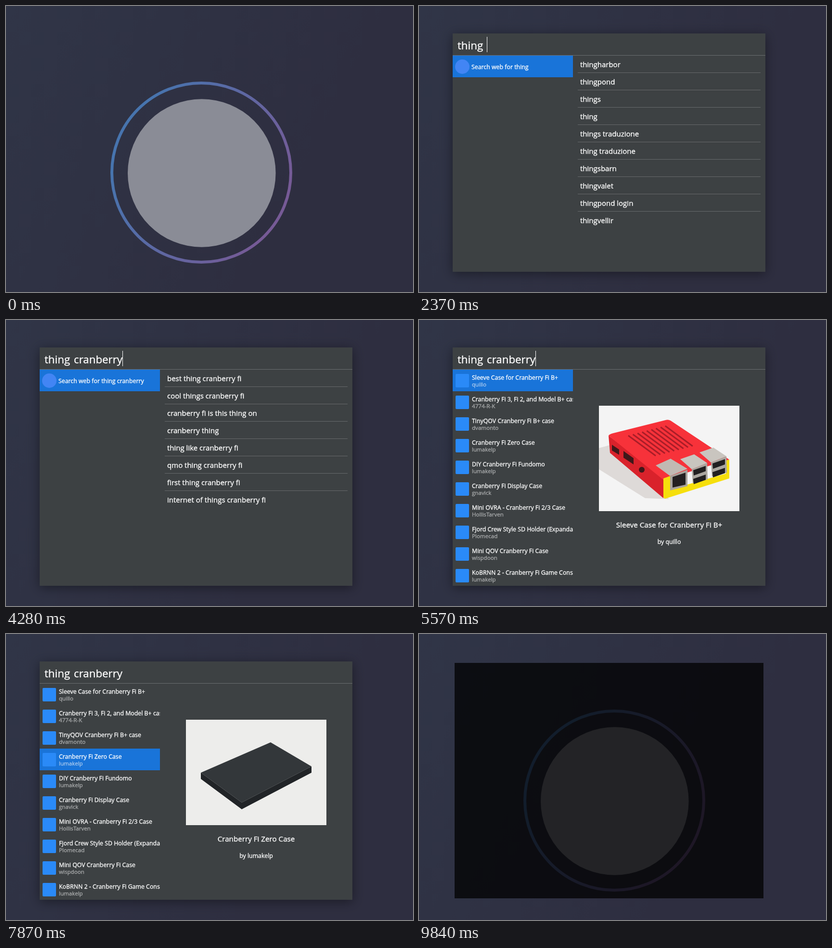
Animation of 846 by 594 pixels, one loop 9900 ms. Source, as an HTML page with a canvas:

```html
<!DOCTYPE html>
<html lang="en">
<head>
<meta charset="utf-8">
<title>Launcher search</title>
<style>
html, body { margin: 0; width: 846px; height: 594px; overflow: hidden; background: #2e2e40; }
canvas { display: block; }
</style>
</head>
<body>
<canvas id="stage" width="846" height="594"></canvas>
<script>
const c = document.getElementById('stage').getContext('2d');
const LOOP = 9900;
const FONT = '"Open Sans", "Noto Sans", sans-serif';
const SMALL = 12.35;
const QUERY = 'thing cranberry';

// [time, letters typed]
const typing = [[1440, 1], [1600, 2], [1760, 3], [1920, 4], [2080, 5], [2370, 6],
  [2600, 7], [2830, 8], [3000, 9], [3210, 10], [3440, 11], [3580, 12],
  [3810, 13], [3970, 14], [4120, 15]];
// [time, selected row]
const picks = [[4570, 0], [6650, 1], [7330, 2], [7870, 3], [8460, 4], [9080, 5]];
// [time, caret visible]
const blinks = [[210, 1], [670, 0], [1130, 1], [5030, 0], [5570, 1], [6030, 0], [6490, 1],
  [7170, 0], [7330, 1], [7790, 0], [7930, 1], [8400, 0], [8460, 1], [8920, 0],
  [9080, 1], [9600, 0]];

const firstHints = ['thingharbor', 'thingpond', 'things', 'thing', 'things traduzione',
  'thing traduzione', 'thingsbarn', 'thingvalet', 'thingpond login', 'thingvellir'];
const laterHints = ['best thing cranberry fi', 'cool things cranberry fi',
  'cranberry fi is this thing on', 'cranberry thing', 'thing like cranberry fi',
  'qmo thing cranberry fi', 'first thing cranberry fi', 'internet of things cranberry fi'];

const items = [
  { title: 'Sleeve Case for Cranberry Fi B+', by: 'quillo', draw: sleeveCase },
  { title: 'Cranberry Fi 3, Fi 2, and Model B+ case with OMRA mounts and more', by: '4774-R-K',
    lines: ['Cranberry Fi 3, Fi 2, and Model B+ case with OMRA', 'mounts and more'], draw: ventCase },
  { title: 'TinyQOV Cranberry Fi B+ case', by: 'dvamonto', draw: greyBox },
  { title: 'Cranberry Fi Zero Case', by: 'lumakelp', draw: smallCase },
  { title: 'DIY Cranberry Fi Fundomo', by: 'lumakelp', draw: handheld },
  { title: 'Cranberry Fi Display Case', by: 'gnavick', draw: displayCase },
  { title: 'Mini OVRA - Cranberry Fi 2/3 Case', by: 'HollisTarven' },
  { title: 'Fjord Crew Style SD Holder (Expandable)', by: 'Plomecad' },
  { title: 'Mini QOV Cranberry Fi Case', by: 'wispdoon' },
  { title: 'KoBRNN 2 - Cranberry Fi Game Console', by: 'lumakelp' }
];

function at(track, t, start) {
  let value = start;
  for (const [time, v] of track) if (t >= time) value = v;
  return value;
}

function rect(color, x, y, w, h) {
  c.fillStyle = color;
  c.fillRect(x, y, w, h);
}

function fill(color, path) {
  c.fillStyle = color;
  c.fill(new Path2D(path));
}

function stroke(color, width, path) {
  c.strokeStyle = color;
  c.lineWidth = width;
  c.stroke(new Path2D(path));
}

function disc(color, x, y, r) {
  c.fillStyle = color;
  c.beginPath();
  c.arc(x, y, r, 0, Math.PI * 2);
  c.fill();
}

function box(color, x, y, w, h, r) {
  c.fillStyle = color;
  c.beginPath();
  c.roundRect(x, y, w, h, r);
  c.fill();
}

// A hairline outline gives the glyphs a slightly heavier weight.
function text(str, x, y, size, color = '#fff', align = 'left') {
  c.font = size + 'px ' + FONT;
  c.textAlign = align;
  c.fillStyle = c.strokeStyle = color;
  c.lineWidth = 0.35;
  c.lineJoin = 'round';
  c.fillText(str, x, y);
  c.strokeText(str, x, y);
}

function gradient(x0, y0, x1, y1, from, to) {
  const g = c.createLinearGradient(x0, y0, x1, y1);
  g.addColorStop(0, from);
  g.addColorStop(1, to);
  return g;
}

function wallpaper() {
  rect(gradient(0, 0, 640, 330, '#303547', '#2e2e40'), 0, 0, 846, 594);
  c.strokeStyle = gradient(260, 270, 560, 430, '#4774ae', '#765a96');
  c.lineWidth = 6;
  c.beginPath();
  c.arc(406, 346, 186, 0, Math.PI * 2);
  c.stroke();
  disc('#8a8c96', 406.8, 347, 153.8);
}

function panel(h) {
  c.save();
  c.shadowColor = 'rgba(0,0,0,.4)';
  c.shadowBlur = 22;
  c.shadowOffsetY = 4;
  rect('#3d4143', 70, 57, 650, h);
  c.restore();
}

function searchBar(query, caret) {
  c.wordSpacing = '2.2px';
  text(query, 80, 90, 22.3);
  const x = Math.round(80 + c.measureText(query).width);
  c.wordSpacing = '0px';
  if (caret) rect('#fff', x, 64, 1, 32);
}

function hints(query, list) {
  rect('#1974d9', 70, 103, 250, 45);
  disc('#4285f4', 90, 126, 15);
  text('Search web for ' + query.trim(), 109, 131, SMALL);
  list.forEach((hint, i) => {
    text(hint, 335, 127 + 36 * i, 15);
    if (i) rect('#66696b', 330, 102 + 36 * i, 380, 1);
  });
}

function results(pick) {
  c.save();
  c.beginPath();
  c.rect(70, 103, 250, 449);
  c.clip();
  items.forEach((item, i) => {
    const y = 103 + 45 * i;
    if (i === pick) rect('#1974d9', 70, y, 250, 45);
    box('#2a8af8', 76, y + 9, 28, 28, 2);
    text(item.title, 110, y + 21, SMALL);
    text(item.by, 110, y + 35, 11.6, i === pick ? '#a9c9ee' : '#a9abac');
  });
  c.restore();
}

function preview(item) {
  const lines = item.lines || [item.title];
  const top = 178 - 9 * (lines.length - 1);
  c.save();
  c.beginPath();
  c.rect(374, top, 292, 219);
  c.clip();
  item.draw();
  c.restore();
  lines.forEach((line, i) => text(line, 520, top + 253 + 18 * i, 15.2, '#fff', 'center'));
  text('by ' + item.by, 520, top + 269 + 18 * lines.length, SMALL, '#fff', 'center');
}

function usb(x, y) {
  fill('#c9c5bf', `M${x} ${y}l29 -10 27 18 -32 13z`);
  fill('#aaa69f', `M${x + 24} ${y + 21}l32 -13 1 34 -31 8z`);
  for (const d of [0, 18]) fill('#211f20', `M${x + 27} ${y + 23 + d}l26 -9v11l-25 9z`);
}

function sleeveCase() {
  rect('#f4f4f4', 374, 178, 292, 219);
  fill('#dedad8', 'M374 266L396 260 520 372 470 370 374 310z');
  fill('#d9222b', 'M394 240L508 328 508 370 397 276z');
  fill('#f7323a', 'M394 240Q396 237 404 235L512 208Q518 206 523 209L645 290 508 332z');
  for (let i = 0; i < 9; i++) {
    const x = 435 + i * 9.6, y = 240 - i * 2.5;
    stroke('#a91d28', 3, `M${x} ${y}l57 42`);
  }
  fill('#40181a', 'M401 259l15 10v11l-15 -9zM425 272l21 15v13l-21 -14z');
  disc('#40181a', 463, 311, 6);
  fill('#f6df0c', 'M508 329L522 324 522 352 638 319 638 292 645 290V329L512 371Q508 371 508 366z');
  fill('#c1b9b3', 'M492 302L523 288 558 309 522 324z');
  fill('#a8a29b', 'M522 324L558 311V345L522 354z');
  fill('#242021', 'M527 326L554 317V342L527 348z');
  usb(543, 289);
  usb(583, 275);
}

function ventCase() {
  rect(gradient(374, 169, 666, 388, '#dfe2e6', '#d2d5da'), 374, 169, 292, 219);
  fill('#bfc3c8', 'M405 292L510 366 560 366 640 300 620 350 540 384 450 350z');
  stroke('#55595e', 13, 'M412 283L440 287M516 353L540 352');
  fill('#55595e', 'M418 260L530 340 630 275V294L532 366 418 283z');
  disc('#c5c7ca', 412, 283, 3);
  disc('#26282b', 516, 354, 4);
  fill('#b3141f', 'M417 238L530 332 629 262V282L534 356 522 350 417 262z');
  fill('#d91f2b', 'M416 237Q418 231 426 231L486 188Q494 185 501 192L626 253Q632 258 627 267L538 333Q529 340 521 333z');
  disc('#611016', 496, 243, 7);
  const arms = [[484, 212, 520, 226, 531, 249], [470, 238, 474, 259, 497, 276], [472, 224, 494, 228, 516, 254],
    [462, 247, 470, 271, 491, 282], [487, 221, 510, 235, 519, 259]];
  for (const [a, b, d, e, f, g] of arms) stroke('#611016', 5, `M${a} ${b}Q${d} ${e} ${f} ${g}`);
  stroke('#611016', 3, 'M460 233L482 218M489 283L514 267');
  stroke('#af1722', 4, 'M506 203L577 246M501 207L536 227');
  fill('#24262a', 'M430 269l14 10v6l-14 -9zM456 281l21 15v9l-21 -14z');
  disc('#24262a', 494, 316, 6);
  fill('#c7c8ca', 'M550 326L573 313V337L550 350z');
  fill('#222428', 'M553 329L570 319V335L553 346z');
  for (const [x, y] of [[552, 286], [582, 268]]) {
    fill('#d2d0cc', `M${x} ${y}l28 -10 19 19 -24 11z`);
    fill('#aaa9a7', `M${x + 24} ${y + 20}l23 -10v26l-22 13z`);
    for (const d of [0, 14]) fill('#26282b', `M${x + 27} ${y + 21 + d}l17 -8v10l-17 8z`);
  }
  for (const [x, y] of [[422, 239], [492, 193], [621, 261], [529, 330]]) {
    disc('#a91621', x, y, 8);
    disc('#d5d4d2', x, y, 5);
    disc('#777', x, y, 2);
  }
}

function greyBox() {
  rect('#d8d8d6', 374, 178, 292, 219);
  fill('#babab7', 'M410 270L520 222 635 280 520 340z');
  fill('#8e8e8d', 'M410 270L520 340V375L410 302z');
  fill('#6c6c6d', 'M520 340L635 280V312L520 375z');
}

function smallCase() {
  rect('#ededeb', 374, 178, 292, 219);
  fill('#33373a', 'M405 288L550 225 635 275 490 350z');
  fill('#212427', 'M405 288L490 350 635 275V288L490 364 405 301z');
}

function handheld() {
  rect(gradient(540, 178, 500, 347, '#4a4949', '#3c3a3a'), 374, 178, 292, 219);
  rect(gradient(374, 347, 666, 397, '#745330', '#6d5636'), 374, 347, 292, 50);
  fill('#8a3d33', 'M478 377L562 371V397H482z');
  fill('#6f9874', 'M582 372H650V397H582z');
  box('#5fc3bd', 580, 185, 76, 187, 12);
  fill('#cf3447', 'M467 230L478 225V377L469 370z');
  fill('#ee485b', 'M473 225H553Q562 225 563 235L561 365Q560 370 554 371L478 377Q472 376 472 368z');
  rect('#2d2731', 466, 247, 3, 15);
  rect('#2d2731', 467, 325, 3, 13);
  rect('#8a8783', 514, 221, 9, 4);
  box('#302c37', 488, 236, 59, 48, 3);
  rect('#9fd5e7', 495, 240, 46, 36);
  rect('#4e8cc9', 495, 253, 46, 9);
  rect('#65ad71', 495, 262, 46, 9);
  rect('#e5e2da', 495, 271, 46, 8);
  box('#3e3941', 486, 313, 25, 9, 2);
  box('#3e3941', 494, 305, 9, 25, 2);
  disc('#69428f', 539, 322, 6);
  disc('#bcb1b1', 550, 309, 5);
  c.lineCap = 'round';
  stroke('#40313d', 5, 'M512 345L517 340M525 344L531 339');
  c.lineCap = 'butt';
}

function displayCase() {
  rect('#cfd1d2', 374, 178, 292, 219);
  fill('#222528', 'M410 220L610 208 632 350 425 368z');
  fill('#46647d', 'M424 232L600 221 617 338 437 354z');
}

function frame(t) {
  wallpaper();
  if (t < 210) return;
  if (t >= 9840) {
    rect('rgba(0,0,0,.75)', 74, 60, 642, 489);
    return;
  }
  const query = QUERY.slice(0, at(typing, t, 0));
  const pick = at(picks, t, -1);
  panel(query ? 495 : 45);
  searchBar(query, at(blinks, t, 0));
  if (!query) return;
  rect('#6b6e70', 70, 102, 650, 1);
  if (pick < 0) {
    hints(query, t < 2080 ? [] : t < 3000 ? firstHints : laterHints);
  } else {
    results(pick);
    preview(items[pick]);
  }
}

const start = performance.now();
function tick() {
  frame((performance.now() - start) % LOOP);
  requestAnimationFrame(tick);
}
tick();
</script>
</body>
</html>
```
